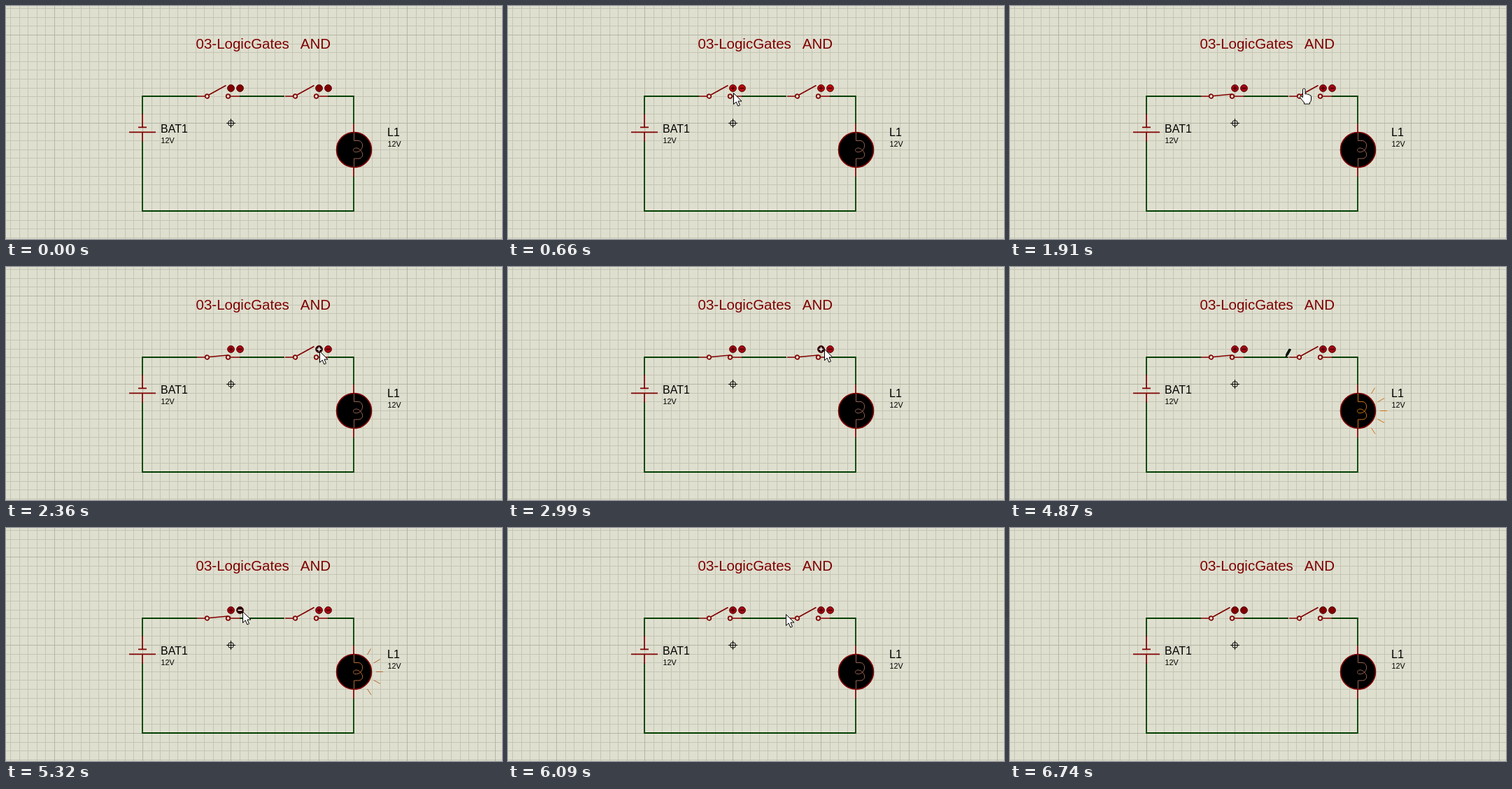
An HTML page for the animation above (7320 ms loop, 709x333 px).

```html
<!DOCTYPE html>
<html lang="en">
<head>
<meta charset="utf-8">
<title>Logic gate AND</title>
<style>
  html, body { margin: 0; width: 100%; height: 100%; overflow: hidden; background: #dfdfcf; }
  svg { display: block; width: 709px; height: 333px; }
  text { font-family: "Liberation Sans", Arial, sans-serif; white-space: pre; }
  .wire { fill: none; stroke: #004000; stroke-width: 1.8; }
  .part { fill: none; stroke: #800000; stroke-width: 1.7; }
  .cursor path { stroke: #000; stroke-width: 1; stroke-linejoin: round; fill: #fff; }
</style>
</head>
<body>
<svg id="stage" viewBox="0 0 709 333" xmlns="http://www.w3.org/2000/svg">
  <g id="grid" shape-rendering="crispEdges"></g>

  <text x="271.5" y="61" font-size="20.5" fill="#800000">03-LogicGates   AND</text>
  <text x="221" y="181" font-size="16">BAT1</text>
  <text x="221.5" y="196" font-size="10.8">12V</text>
  <text x="545" y="186" font-size="16">L1</text>
  <text x="545.5" y="201" font-size="10.8">12V</text>

  <path class="wire" d="M195 155V129H273M334 129H398M460 129H497V168M497 244V293H195V193"/>
  <path class="part" d="M195 154V173M189 173.3H201M176 180.3H214M195 180V194M497 168V181M497 230V244"/>

  <g fill="none" stroke="#000">
    <circle cx="321.5" cy="167.5" r="4"/>
    <path d="M315 167.5H328M321.5 161V174"/>
  </g>

  <circle cx="497.5" cy="205.5" r="25" fill="#000" stroke="#800000" stroke-width="1.6"/>
  <path id="filament" fill="none" d="M497.5 181V192.5H504C511 193 511.5 204 505 207.5C500 210 496 208.500 496.500 205.500C498 201.500 504 202.500 507 206.500C511.500 211 510 218 504 218H497.500V230"/>
  <path id="rays" d="M516.500 181L521.500 172.500M525.500 193L535 187.500M529 205.500H539M525.500 217.500L535 222.500M516.500 230L522 238.500"/>

  <g id="switches"></g>

  <g class="cursor" id="cursor">
    <path data-kind="arrow" d="M.5 .5V16.500L4.200 13L6.800 19L9.500 17.800L7 12H12Z"/>
    <path data-kind="hand" d="M-1.500 1Q.5 -1.500 2 1V8Q4 6.500 5.500 8.500Q7 7.500 8.300 9.500Q10.500 9 10.500 12V16Q10.500 18 8.500 20V22H.5V20Q-3 16 -5.500 12.500Q-5.500 9.500 -1.500 12.500Z"/>
    <path data-kind="pencil" style="fill:#0a1a10" d="M0 0L1 -5L5 -12L7.500 -11L3.500 -3.500Z"/>
  </g>
</svg>
<script>
const LOOP = 7320;
const byId = id => document.getElementById(id);

function add(parent, tag, attrs) {
  const node = document.createElementNS("http://www.w3.org/2000/svg", tag);
  for (const key in attrs) node.setAttribute(key, attrs[key]);
  return parent.appendChild(node);
}

// Grid centred on the origin mark, with a stronger line every ten cells.
function drawGrid() {
  const cell = 12.6;
  for (const major of [false, true]) {
    const stroke = major ? "#b5b5a6" : "#c5c5b6";
    for (let i = -30; i <= 31; i++) {
      if ((i % 10 === 0) !== major) continue;
      const x = Math.round(321 + i * cell) + 0.5;
      const y = Math.round(167 + i * cell) + 0.5;
      add(byId("grid"), "path", { d: `M${x} 0V333M0 ${y}H709`, stroke });
    }
  }
}

function makeSwitch(x, closeAt, openAt) {
  const group = add(byId("switches"), "g", { transform: `translate(${x} 0)` });
  add(group, "path", { class: "part", d: "M-14.500 129H-3M33 129H47" });
  const blade = add(group, "path", { class: "part" });
  for (const cx of [0, 30]) {
    add(group, "circle", { class: "part", cx, cy: 129, r: 2.8, style: "fill:#dfdfcf" });
  }
  const buttons = [34, 47].map((cx, i) => ({
    x: x + cx,
    disc: add(group, "circle", { cx, cy: 117.5, r: 4.9, stroke: "#500000" }),
    glyph: add(group, "path", {
      d: i ? `M${cx - 3} 117.5h6` : `M${cx - 3} 117.5h6M${cx} 114.500v6`,
      "stroke-width": 1.6
    })
  }));
  return { blade, buttons, closeAt, openAt };
}

drawGrid();
const switches = [makeSwitch(287.5, 1240, 5660), makeSwitch(413.5, 2900, 4110)];

// Pointer path: time, x, y
const pointerPath = [
  [80, 631, 305], [660, 322, 124], [750, 320, 119], [870, 321, 118], [1620, 321, 118],
  [1910, 420, 118], [2320, 447, 120], [2650, 452, 117], [3440, 452, 117],
  [3700, 462, 117], [4360, 462, 117], [4870, 394, 129], [5070, 342, 121],
  [5420, 336, 118], [6000, 336, 118], [6090, 397, 123], [6700, 619, 328], [6740, 619, 328]
];

const clamp = v => Math.max(0, Math.min(1, v));
const mix = (a, b, k) => a + (b - a) * k;
const mixColor = (a, b, k) => `rgb(${a.map((v, i) => Math.round(mix(v, b[i], k)))})`;

function pointerAt(t) {
  const next = pointerPath.findIndex(p => p[0] > t);
  if (next < 1) return null;
  const [t0, x0, y0] = pointerPath[next - 1];
  const [t1, x1, y1] = pointerPath[next];
  const k = (t - t0) / (t1 - t0);
  return { x: Math.round(mix(x0, x1, k)), y: Math.round(mix(y0, y1, k)) };
}

function cursorKind({ x, y }) {
  if (x > 336 && x < 397 && Math.abs(y - 129) < 4) return "pencil";
  const overBlade = [287, 413].some(left => x > left - 3 && x < left + 27);
  return overBlade && y > 111 && y < 133 ? "hand" : "arrow";
}

function drawSwitch({ blade, buttons, closeAt, openAt }, t, pointer) {
  const closed = t >= closeAt && t < openAt;
  blade.setAttribute("d", closed ? "M3 128.500L30 126" : "M2.500 127L27 113.500");
  const running = t >= 160 && t < 6700;
  for (const { x, disc, glyph } of buttons) {
    const hover = pointer && Math.hypot(pointer.x - x, pointer.y - 117.5) < 6;
    disc.setAttribute("fill", hover ? "#200000" : !running ? "#800000" : t < 870 ? "#c00c0c" : "#a80814");
    glyph.setAttribute("stroke", hover ? "#fff" : running ? "#480008" : "none");
  }
}

function drawLamp(t) {
  const heat = clamp((t - 3020) / 120) * (1 - clamp((t - 4360) / 1300));
  const level = Math.round(heat * 10) / 10;
  const amber = [205, 115, 20];
  const glow = level < 0.6
    ? mixColor([150, 98, 80], amber, level / 0.6)
    : mixColor(amber, [255, 225, 40], (level - 0.6) / 0.4);
  byId("filament").setAttribute("stroke", glow);
  byId("rays").setAttribute("stroke", glow);
  byId("rays").setAttribute("visibility", level >= 0.25 ? "visible" : "hidden");
}

function render(t) {
  const pointer = pointerAt(t);
  switches.forEach(s => drawSwitch(s, t, pointer));
  drawLamp(t);
  const kind = pointer && cursorKind(pointer);
  for (const shape of byId("cursor").children) {
    shape.setAttribute("visibility", shape.dataset.kind === kind ? "visible" : "hidden");
  }
  if (pointer) byId("cursor").setAttribute("transform", `translate(${pointer.x} ${pointer.y})`);
}

const start = performance.now();
function tick() {
  render((performance.now() - start) % LOOP);
  requestAnimationFrame(tick);
}
tick();
</script>
</body>
</html>
```
